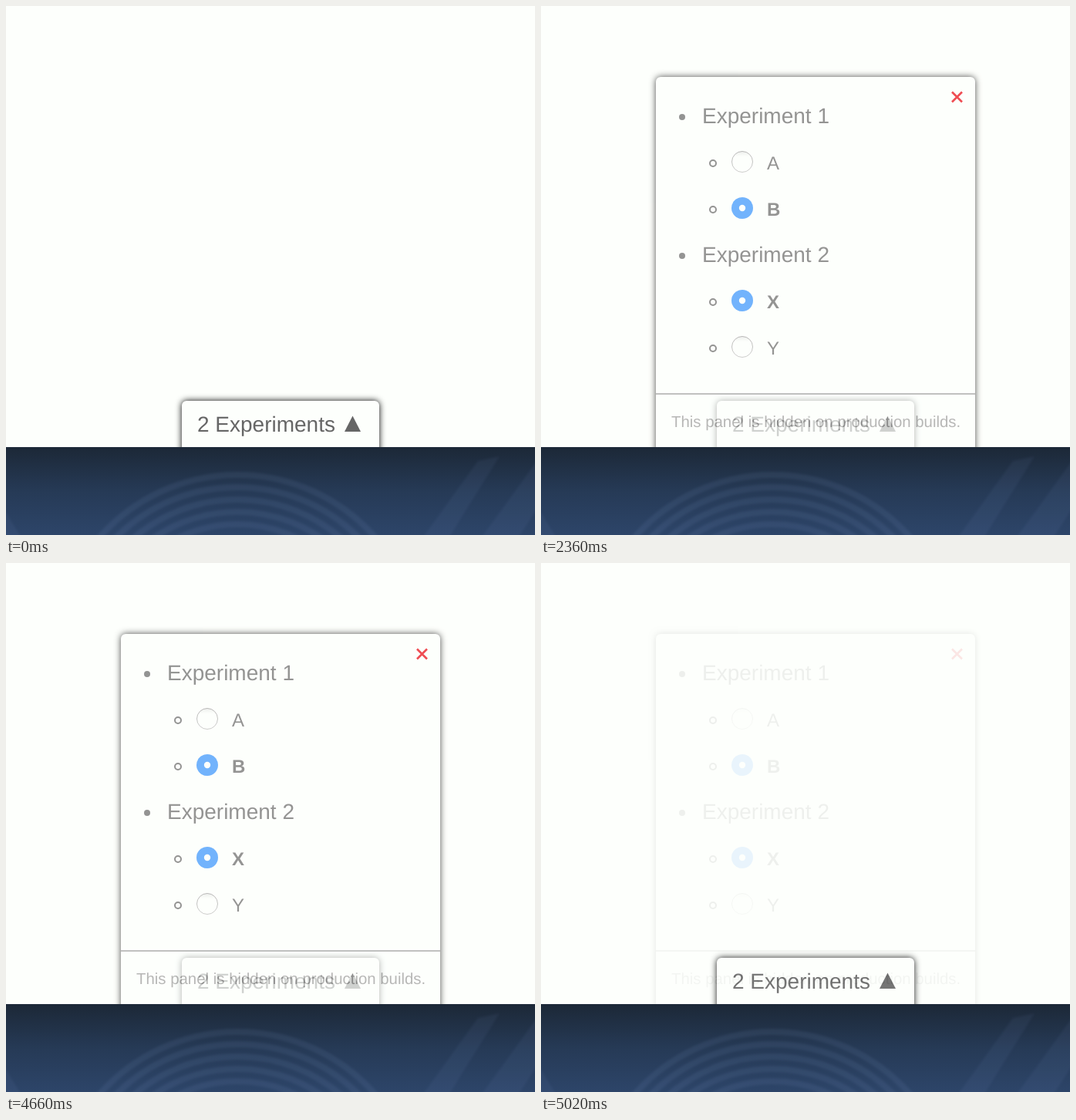
These frames come from a looping animation (686 by 686 pixels, 5080 ms). An HTML page:

```html
<!DOCTYPE html>
<html lang="en">
<head>
<meta charset="utf-8">
<title>Experiments panel</title>
<style>
  html, body { margin: 0; width: 100%; height: 100%; overflow: hidden; background: #fdfffc; }
  .stage { position: relative; width: 686px; height: 686px; overflow: hidden; }
  .layer, svg { position: absolute; left: 0; top: 0; width: 686px; height: 686px; }
  .layer { background: #fdfffc; }
  .box {
    position: absolute; height: 600px; border-radius: 6px;
    background: #fdfffc; box-shadow: 0 0 8px #000;
  }
  .tab { left: 228px; top: 512px; width: 256px; }
  .panel { left: 149px; top: 92px; width: 414px; }
  .open { animation: fade 5080ms infinite; }

  /* Nine 60 ms steps in each direction, with two-second holds */
  @keyframes fade {
    0%     { opacity: 0;  animation-timing-function: step-end; }
    39.37% { opacity: .1; animation-timing-function: steps(9, end); }
    50%    { opacity: 1;  animation-timing-function: step-end; }
    89.37% { opacity: .9; animation-timing-function: steps(9, end); }
    100%   { opacity: 0; }
  }

  text {
    font: 28px "Liberation Sans", Arial, sans-serif;
    fill: #666; text-rendering: geometricPrecision;
  }
  .option { font-size: 24px; }
  .chosen { font-weight: bold; }
  .note { font-size: 20.4px; fill: #999; }
  .ink { fill: #666; }
  .ring { fill: none; stroke: #666; stroke-width: 2; }
</style>
</head>
<body>
<div class="stage">
  <div class="layer">
    <div class="box tab"></div>
    <svg viewBox="0 0 686 686">
      <text x="248" y="552">2 Experiments</text>
      <path class="ink" d="M449.5 531.5L460 552H439Z"/>
    </svg>
  </div>

  <div class="layer open">
    <div class="box panel"></div>
    <svg viewBox="0 0 686 686">
      <defs>
        <linearGradient id="rim" x2="0" y2="1">
          <stop stop-color="#999"/><stop offset="1" stop-color="#b8b8b8"/>
        </linearGradient>
        <linearGradient id="dish" x2="0" y2="1">
          <stop stop-color="#e6e8e6"/><stop offset=".25" stop-color="#fdfffc"/>
        </linearGradient>
        <g id="off">
          <circle class="ring" cx="223" cy="2" r="4"/>
          <circle cx="261" r="13.5" fill="url(#dish)" stroke="url(#rim)"/>
        </g>
        <g id="on">
          <circle class="ring" cx="223" cy="2" r="4"/>
          <circle cx="261" r="14" fill="#3593fd"/>
          <circle cx="261" r="4.2" fill="#fdfffc"/>
        </g>
      </defs>

      <path d="M533 111.5l13 13m0-13l-13 13" stroke="#e8000b" stroke-width="2.6"/>

      <circle class="ink" cx="183" cy="144" r="4"/>
      <text x="209" y="152">Experiment 1</text>
      <use href="#off" y="202"/>
      <text class="option" x="293" y="212">A</text>
      <use href="#on" y="262"/>
      <text class="option chosen" x="293" y="272">B</text>

      <circle class="ink" cx="183" cy="324" r="4"/>
      <text x="209" y="332">Experiment 2</text>
      <use href="#on" y="382"/>
      <text class="option chosen" x="293" y="392">X</text>
      <use href="#off" y="442"/>
      <text class="option" x="293" y="452">Y</text>

      <path d="M149 503H563" stroke="#a6a6a6" stroke-width="2"/>
      <text class="note" x="169" y="546">This panel is hidden on production builds.</text>
    </svg>
  </div>

  <svg viewBox="0 0 686 686">
    <defs>
      <linearGradient id="navy" x2="0" y2="1">
        <stop stop-color="#1c2837"/>
        <stop offset=".5" stop-color="#263a56"/>
        <stop offset="1" stop-color="#2d4569"/>
      </linearGradient>
      <clipPath id="strip"><path d="M0 572H686V686H0Z"/></clipPath>
      <filter id="soft" x="-10%" y="-10%" width="120%" height="120%">
        <feGaussianBlur stdDeviation="1.5"/>
      </filter>
    </defs>
    <path d="M0 572H686V686H0Z" fill="url(#navy)"/>
    <g clip-path="url(#strip)">
      <g filter="url(#soft)" fill="none" stroke="#7d9cd0" stroke-opacity=".1" stroke-width="8">
        <circle cx="300" cy="846" r="238"/>
        <circle cx="300" cy="846" r="222"/>
        <circle cx="300" cy="846" r="206"/>
        <circle cx="300" cy="846" r="190"/>
        <circle cx="300" cy="846" r="174"/>
      </g>
      <g filter="url(#soft)" fill="#7d9cd0" fill-opacity=".07">
        <path d="M540 690L612 590L640 584L574 690Z"/>
        <path d="M616 690L690 588V650L664 690Z"/>
        <path d="M-4 650L20 690H-4Z"/>
      </g>
    </g>
  </svg>
</div>
</body>
</html>
```
